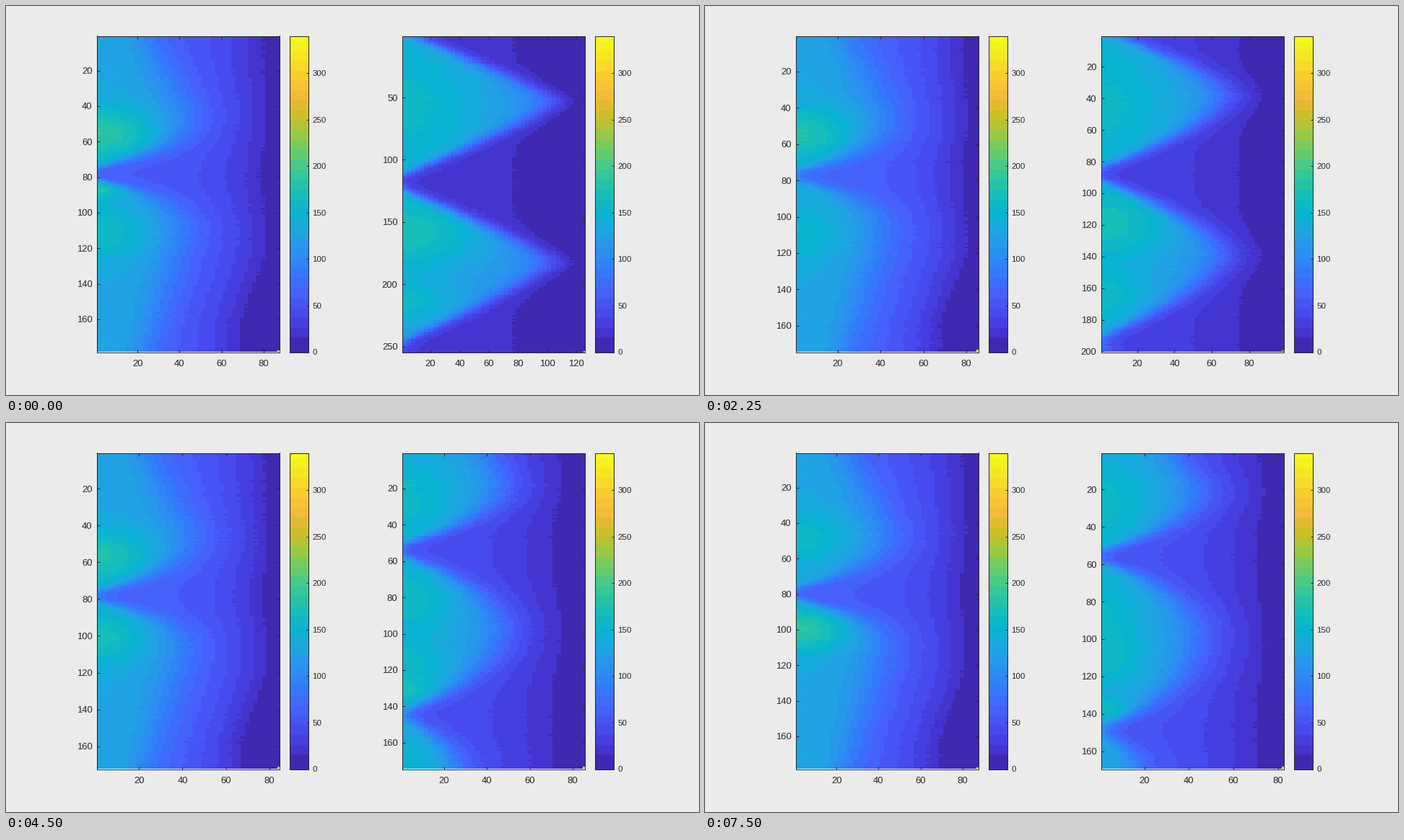
A matplotlib script for the animation above (8 s loop, 960x540 px).

```python
import numpy as np
import matplotlib.pyplot as plt
from matplotlib.animation import FuncAnimation
from matplotlib.colors import LinearSegmentedColormap
from matplotlib.ticker import MultipleLocator

W, H, DPI = 960, 540, 100
PX = 72 / DPI
VMAX = 340
INK = "#262626"
plt.rcParams["font.family"] = "Liberation Sans"

CMAP = LinearSegmentedColormap.from_list("heat", (
    "#3e26a8 #4537d5 #484df0 #4563fd #327cfc #2b91ef #20a5e3 #08b5d0 #19bfb6 "
    "#37c897 #64cd6f #9dc943 #d1bf27 #f8ba3d #fccf30 #f5e924 #f9fb15").split())


def paint(values):
    """Map values to colours in coarse bands, two of 64 steps each."""
    step = np.clip(values / VMAX * 64, 0, 63).astype(int)
    band = np.maximum((step - 1) // 2, 0)
    return CMAP(np.where(band == 0, 0.8, 2 * band + 1.5) / 64)[..., :3]


# Values at the key steps; heights are percent of the map
KEYS = [0, 1, 3, 5, 7, 9, 10]
LEFT = dict(
    rows=[178, 175, 174, 169, 174, 177, 178],
    tail=[58, 58, 66, 74, 54, 54, 60],
    gap=[43.5, 44.5, 44.4, 46, 45, 47, 44.6],
    hot1=[31, 32, 31, 34, 32, 30, 27],
    gain1=[55, 52, 46, 48, 46, 31, 28],
    hot2=[62, 61, 62, 62, 55, 58, 56],
    gain2=[32, 26, 22, 28, 48, 52, 56],
)
RIGHT = dict(
    rows=[254, 218, 200, 180, 168, 169, 169],
    tail=[24, 30, 34, 45, 48, 52, 52],
    gap=[46, 44, 43.7, 28, 33, 33.5, 32.5],
    gap2=[97, 96, 96, 79.5, 86.5, 90, 88],
    top=[.06, .05, .08, .57, .42, .38, .4],
    bottom=[-.04, -.03, 0, .38, .25, .2, .2],
)


def at(tracks, step):
    return [np.interp(step, KEYS, t) for t in tracks.values()]


def left_scene(step):
    rows, tail, gap, hot1, gain1, hot2, gain2 = at(LEFT, step)
    rows = int(rows + .5)
    cols = round(82 + (rows - 169) / 1.8)
    low = -.13 + .007 * max(tail - 58, 0)
    edge = (0, .27), (24, .52), (gap, low), (63, .49), (100, .27)
    spots = [
        (hot1, gain1, 6, .26),
        (hot2, gain2, 8 - .055 * gain2, .22),
        (gap + 5, 42 * np.exp(-2 * step), 2, .12),
    ]
    return rows, cols, tail, 2.5, .13, edge, spots


def right_scene(step):
    rows, tail, gap, gap2, top, bottom = at(RIGHT, step)
    rows = int(rows + .5)
    cols = (rows - 4) // 2
    age = (tail - 24) / 28
    peak = .56 + .3 * (1 - age) ** 1.6
    edge = ((0, top), (.7 * gap - 11.5, peak), (gap, -.08),
            (gap + 25.5, peak - .01), (gap2, -.01), (100, bottom))
    wide = .48 - .25 * age
    spots = [
        (gap / 2, 26, gap / 3, wide),
        (gap + 16, 40 - 18 * age ** 3, 8, .8 * wide),
        (gap + 38 - max(tail - 46, 0), 28, 1.5 + .1 * tail, .19),
        (gap2 - 7, 30 * age, 2.7, .12),
        (gap2 + 14, 200 * max(bottom - .24, 0), 7, .2),
    ]
    return rows, cols, tail, 1.1 + .92 * age, .035 + .067 * age, edge, spots


def reach(y, edge, power):
    """Extent of the lobes at height y: bowed near valleys, else straight."""
    ys, rs = np.array(edge).T
    i = np.clip(np.searchsorted(ys, y) - 1, 0, len(ys) - 2)
    u = np.clip((y - ys[i]) / (ys[i + 1] - ys[i]), 0, 1)
    a, b = rs[i], rs[i + 1]
    rise = (a < b) & (a < .12)
    fall = (b < a) & (b < .12)
    u = np.where(rise, 1 - (1 - u) ** power, np.where(fall, u ** power, u))
    return a + (b - a) * u


def heat_map(scene, step, bend, drop):
    rows, cols, level, power, soft, edge, spots = scene(step)
    rng = np.random.default_rng(40 + step)
    block = max(2, round(cols / 42))
    x = ((np.arange(cols) // block + .5) * block / cols)[None, :]
    y = (np.arange(rows) + .5) / rows * 100

    lobe = np.mean([reach(y + o, edge, power) for o in np.linspace(-2, 2, 9)], axis=0)
    shift = rng.normal(0, .003, rows) + (rng.random(rows) < .05) * .015
    x = np.clip(x + shift[:, None], 0, 1)
    y, lobe = y[:, None], lobe[:, None]

    end = 1 - drop * np.clip((y - 70) / 20, 0, 1)
    tail = level * np.clip(1 - (x / end) ** bend, 0, 1)
    inner = 132 - 60 * x ** 1.6 + rng.normal(0, 1, (rows, 1))
    for cy, gain, sy, sx in spots:
        inner = inner + gain * np.exp(-.5 * ((y - cy) / sy) ** 2 - .5 * (x / sx) ** 2)
    inside = 1 / (1 + np.exp(-(lobe - x) / (.03 + soft * x)))
    v = tail + np.maximum(inner - tail, 0) * inside
    v[-1, -1] = VMAX
    return v


fig = plt.figure(figsize=(W / DPI, H / DPI), dpi=DPI, facecolor="#ebebeb")


def add_box(x0, x1):
    ax = fig.add_axes([x0 / W, 1 - 480.5 / H, (x1 - x0) / W, 439 / H])
    for s in ax.spines.values():
        s.set(linewidth=PX, color=INK)
    return ax


def add_map(x0):
    ax = add_box(x0, x0 + 253)
    img = ax.imshow(np.zeros((2, 2, 3)), aspect="auto", interpolation="nearest")
    ax.tick_params(direction="in", length=4 * PX, width=PX, color=INK, top=True,
                   right=True, labelsize=13 * PX, labelcolor=INK)
    ax.tick_params(axis="x", pad=10 * PX)
    ax.tick_params(axis="y", pad=6 * PX)
    ax.xaxis.set_major_locator(MultipleLocator(20))
    return ax, img


def add_bar(x0):
    ax = add_box(x0, x0 + 26)
    ramp = np.linspace(0, VMAX, 640)[:, None]
    ax.imshow(paint(ramp), aspect="auto", origin="lower", interpolation="nearest",
              extent=(0, 1, 0, VMAX))
    ax.set_xticks([])
    ax.set_yticks(range(0, 301, 50))
    ax.yaxis.tick_right()
    ax.tick_params(axis="y", direction="in", length=3 * PX, width=PX, color=INK,
                   pad=6 * PX, labelsize=11.5 * PX, labelcolor=INK)


panels = [
    (*add_map(125.5), left_scene, 3, .14),
    (*add_map(548.5), right_scene, 2.2, 0),
]
add_bar(392.5)
add_bar(815.5)


def update(i):
    step = i // 3
    for ax, img, scene, bend, drop in panels:
        v = heat_map(scene, step, bend, drop)
        rows, cols = v.shape
        img.set_data(paint(v))
        img.set_extent((.5, cols + .5, rows + .5, .5))
        ax.set_xlim(.5, cols + .5)
        ax.set_ylim(rows + .5, .5)
        ax.yaxis.set_major_locator(MultipleLocator(50 if rows > 250 else 20))
    return [p[1] for p in panels]


anim = FuncAnimation(fig, update, frames=32, interval=250, init_func=lambda: update(0),
                     repeat=True, repeat_delay=0, blit=False)
plt.show()
```
